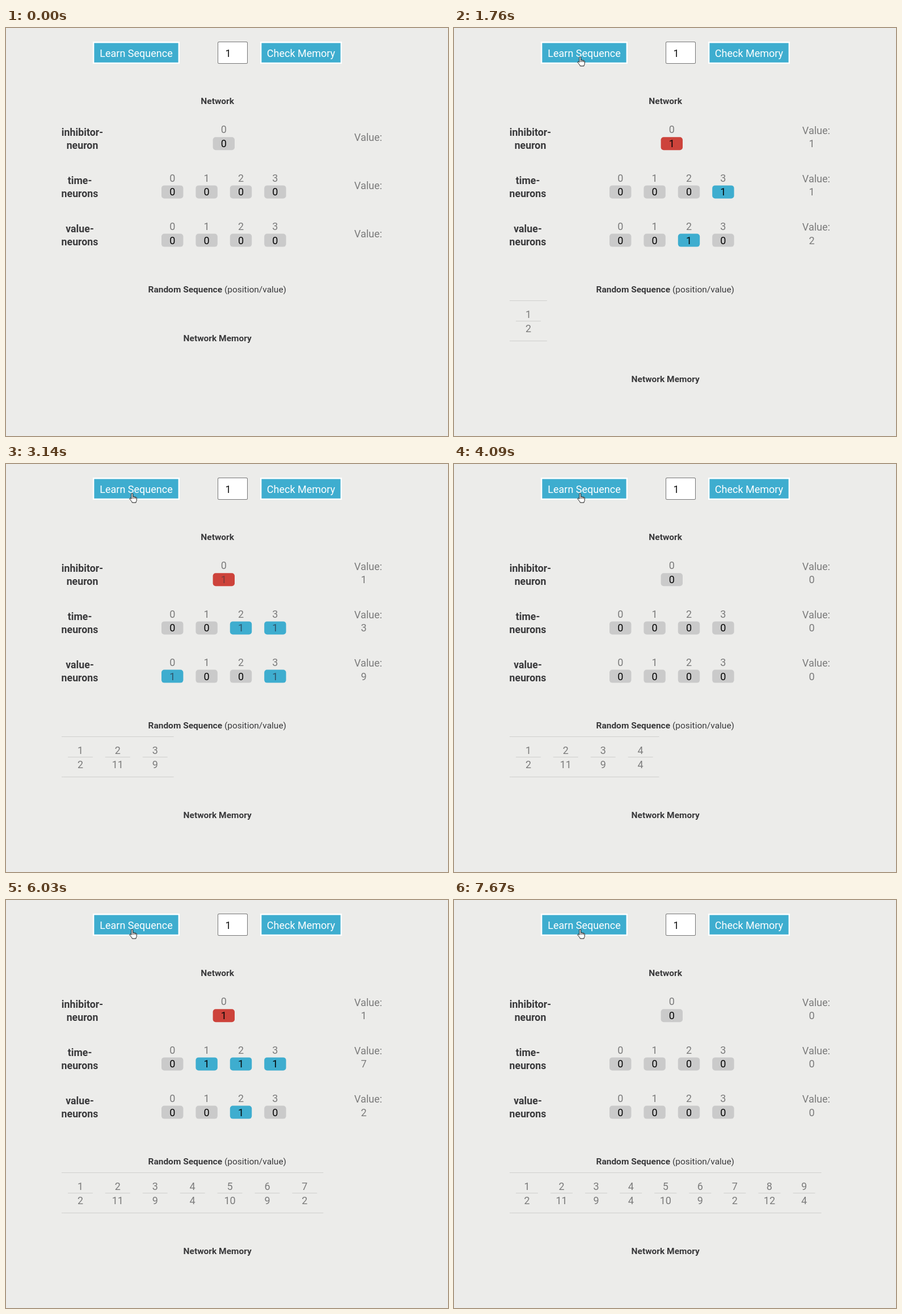
An HTML page with a canvas for the animation above (8 s loop, 779 by 719 pixels).

```html
<!DOCTYPE html>
<html lang="en">
<head>
<meta charset="utf-8">
<title>Sequence memory network</title>
<style>
  html, body { margin: 0; width: 100%; height: 100%; overflow: hidden; background: #ececea; }
  canvas { display: block; }
</style>
</head>
<body>
<canvas id="stage" width="779" height="719"></canvas>
<script>
const ctx = document.getElementById('stage').getContext('2d');
const LOOP = 8000;
const BLUE = '#3eadcf', RED = '#cd433b', PILL = '#cacaca', RULE = '#d0d0ce';
const DARK = '#39393b', GREY = '#7b7b7b', FADED = '#2f5268', FADED_RED = '#7a3a3a';
const ROW_STEP = 85.2;

// One entry per learned item: when its neurons fire, when they rest, its value.
const steps = [
  { on: 1680, off: 2000, value: 2 },
  { on: 2530, off: 2680, value: 11 },
  { on: 3140, off: 3380, value: 9, faded: true },
  { on: 3850, off: 4090, value: 4, faded: true },
  { on: 4640, off: 4790, value: 10 },
  { on: 5320, off: 5470, value: 9 },
  { on: 6030, off: 6180, value: 2 },
  { on: 6710, off: 6880, value: 12 },
  { on: 7420, off: 7580, value: 4 }
];
const rowLabels = [['inhibitor-', 'neuron', 134.5], ['time-', 'neurons', 130], ['value-', 'neurons', 130]];
const cursorStops = [9, 22, 34, 44, 50];

function text(str, x, y, { size = 18, weight = 400, color = GREY, align = 'center' } = {}) {
  ctx.font = `${weight} ${size}px Roboto, sans-serif`;
  ctx.textAlign = align;
  ctx.fillStyle = color;
  ctx.fillText(str, x, y);
}

function box(x, y, w, h, fill, radius = 0) {
  ctx.beginPath();
  ctx.roundRect(x, y, w, h, radius);
  ctx.fillStyle = fill;
  ctx.fill();
}

function heading(str, y) {
  text(str, 372.7, y, { size: 15.5, weight: 700, color: DARK });
}

function button(label, x, w) {
  box(x, 24, w, 39, '#fff');
  box(x + 2.4, 26.4, w - 4.8, 34.4, BLUE);
  text(label, x + w / 2, 50.5, { color: '#fff' });
}

function drawControls() {
  button('Learn Sequence', 153, 153);
  button('Check Memory', 448, 144);
  box(373, 24, 53, 39, '#767676', 2.5);
  box(374, 25, 51, 37, '#fff', 1.5);
  text('1', 386.5, 50.5, { color: '#111', align: 'left' });
}

function neuron(index, x, y, active, activeColor, faded) {
  text(index, x, y - 6.8);
  box(x - 19.2, y, 38.4, 23, active ? activeColor : PILL, 5);
  const dim = activeColor === RED ? FADED_RED : FADED;
  text(active ? 1 : 0, x, y + 18, { color: active && faded ? dim : '#050505' });
}

function drawNetwork(values, started, faded) {
  heading('Network', 134);
  rowLabels.forEach(([top, bottom, x], row) => {
    const y = 192.2 + row * ROW_STEP;
    const bold = { size: 17.8, weight: 700, color: DARK };
    text(top, x, y - 2.6, bold);
    text(bottom, x, y + 20.8, bold);

    const count = row ? 4 : 1;
    const color = row ? BLUE : RED;
    for (let i = 0; i < count; i++) {
      const x = row ? 293.2 + i * 60.4 : 383.8;
      const bit = (values[row] >> (count - 1 - i)) & 1;
      neuron(i, x, y, bit, color, faded);
    }

    text('Value:', 638.4, y + (started ? -5.2 : 6.3));
    if (started) text(values[row], 630.5, y + 18);
  });
}

function drawSequence(count) {
  const title = 'Random Sequence';
  text(title, 250.5, 465.5, { size: 15.5, weight: 700, color: DARK, align: 'left' });
  text('(position/value)', 494, 465.5, { size: 15.5, color: DARK, align: 'right' });
  if (!count) return;

  const pitch = Math.min(65.9, 549.5 / count);
  box(98, 480, pitch * count, 1, RULE);
  box(98, 551, pitch * count, 1, RULE);
  for (let i = 0; i < count; i++) {
    const left = 98 + i * pitch;
    const center = left + pitch / 2;
    text(i + 1, center, 511);
    box(left + 11, 516, pitch - 22, 1, RULE);
    text(steps[i].value, center, 536);
  }
}

function outlined(path) {
  ctx.fillStyle = '#fff';
  ctx.strokeStyle = '#111';
  ctx.lineWidth = 1;
  ctx.lineJoin = 'round';
  ctx.fill(path);
  ctx.stroke(path);
}

const arrow = new Path2D('M.5 .5V14L3.6 11.2 5.8 16.3 8 15.4 5.8 10.4H10Z');
const hand = new Path2D('M4 10.5V2C4 .1 6.6 .1 6.6 2V7C7 6 9 6.2 9 7.4C9.6 6.5 11.3 6.8 11.4 8' +
  'C12.2 7.4 13.3 8 13.3 9.2V12.5C13.3 14.4 12 15 12 17H5.4C5 14.8 2.5 13 1.2 10.9C.5 9.5 2.1 8.6 3 9.5Z');

function drawCursor(t) {
  if (t < 1060) return;
  const stop = Math.min(4, Math.floor((t - 1060) / 77.5));
  const y = cursorStops[stop] + (t >= 2000 ? 1 : 0);
  const overButton = y >= 24;
  ctx.save();
  ctx.translate(overButton ? 217 : 222, y);
  outlined(overButton ? hand : arrow);
  if (overButton) {
    ctx.beginPath();
    for (const x of [6.6, 9, 11.4]) {
      ctx.moveTo(x, 7.5);
      ctx.lineTo(x, 10);
    }
    ctx.stroke();
  }
  ctx.restore();
}

function draw(t) {
  const count = steps.filter(step => t >= step.on).length;
  const current = steps[count - 1];
  const firing = count > 0 && t < current.off;
  const values = firing ? [1, count, current.value] : [0, 0, 0];

  box(0, 0, 779, 719, '#ececea');
  drawControls();
  drawNetwork(values, count > 0, firing && current.faded);
  drawSequence(count);
  heading('Network Memory', count ? 623.5 : 551.5);
  drawCursor(t);
}

const start = performance.now();
function frame() {
  draw((performance.now() - start) % LOOP);
  requestAnimationFrame(frame);
}
frame();
</script>
</body>
</html>
```
